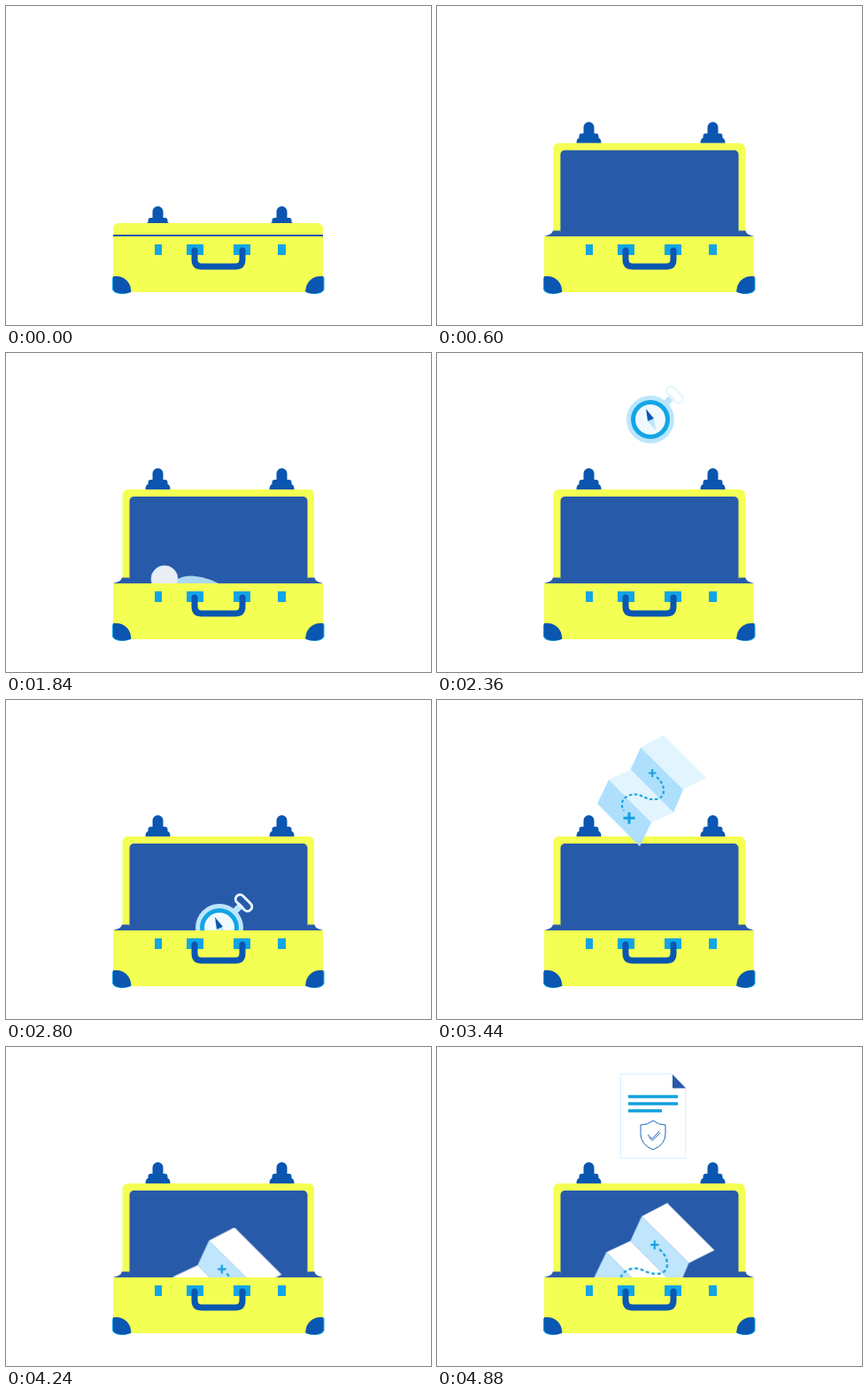
Recreate the animation shown at these times as an HTML page. Size 480 px wide and 360 px high, loop 7840 ms.

```html
<!DOCTYPE html>
<html lang="en">
<head>
<meta charset="utf-8">
<title>Packing a suitcase</title>
<style>
html, body { margin: 0; width: 100%; height: 100%; overflow: hidden; background: #fff; }
svg { display: block; width: 100vw; height: 100vh; }
svg * { animation: 7840ms linear infinite; }

.yellow { fill: #f4ff54; }
.navy { fill: #0a56b0; }
.inside { fill: #285aaa; }
.sky { fill: #12a5e6; }
.pale { fill: #bce6fb; }
.white { fill: #fff; }
.edge { stroke: #d8f1fc; stroke-width: 1; }
.line { fill: none; stroke: #12a0e0; }
.knit { fill: none; stroke: #4aaede; }

/* suitcase */
#feet { animation-name: feet; }
#lid { animation-name: lid; }
#lining { animation-name: lining; }
#wedge { animation-name: wedge; transform-origin: 240px 260px; }
#seam { animation-name: seam; }
@keyframes feet {
  0%, .51% { transform: translateY(96px); animation-timing-function: ease-in-out; }
  8.163%, 100% { transform: none; }
}
@keyframes lid {
  0%, .51% { x: 121px; y: 245px; width: 237px; height: 16px; animation-timing-function: ease-in-out; }
  8.163%, 100% { x: 131.5px; y: 154px; width: 216.5px; height: 106px; }
}
@keyframes lining {
  0%, .51% { x: 128px; y: 260px; width: 223px; height: 0; animation-timing-function: ease-in-out; }
  8.163%, 100% { x: 139.5px; y: 162px; width: 201px; height: 100px; }
}
@keyframes wedge {
  0%, .51% { transform: scaleY(0); animation-timing-function: ease-in-out; }
  8.163%, 100% { transform: none; }
}
@keyframes seam {
  0%, 1% { opacity: 1; }
  1.02%, 100% { opacity: 0; }
}

/* each item pops in above the case, then drops */
#woolens { animation-name: woolens; transform-origin: 241px 133px; }
#compass { animation-name: compass; transform-origin: 244px 252px; }
#map { animation-name: map; transform-origin: 242.5px 102.5px; }
#paper { animation-name: paper; transform-origin: 244px 78px; }
@keyframes woolens {
  0%, 8.673% { transform: translateY(-50px) scale(0); opacity: 1; animation-timing-function: ease-out; }
  12.755%, 13.265% { transform: translateY(-50px) scale(1); animation-timing-function: ease-in; }
  15.306% { transform: none; }
  17.602% { transform: translateY(172px); animation-timing-function: ease-out; }
  19.133%, 23.2% { transform: translateY(166px); opacity: 1; }
  23.469% { transform: translateY(166px); opacity: .9; }
  25.51%, 100% { transform: translateY(166px); opacity: 0; }
}
@keyframes compass {
  0%, 23.597% { transform: translateY(-182px) scale(0); opacity: 1; animation-timing-function: ease-out; }
  28.699%, 30.102% { transform: translateY(-182px) scale(1); animation-timing-function: ease-in; }
  31.122% { transform: translateY(-158px); }
  33.418% { transform: translateY(14px); animation-timing-function: ease-out; }
  35.714%, 38.265% { transform: none; opacity: 1; }
  40.306%, 100% { transform: none; opacity: 0; }
}
@keyframes map {
  0%, 38.265% { transform: scale(0); }
  40.816% { transform: scale(.69); }
  43.878% { transform: scale(1); animation-timing-function: ease-out; }
  45.408%, 46.429% { transform: scale(1.11); animation-timing-function: ease-in; }
  52.041% { transform: translate(.3px, 184px) scale(1.11); animation-timing-function: ease-in; }
  54.082% { transform: translate(.5px, 170.5px) scale(1.11); animation-timing-function: ease-out; }
  62.245%, 100% { transform: translate(2.5px, 143px) scale(1.11); }
}
@keyframes paper {
  0%, 56.122% { transform: scale(0); animation-timing-function: ease-out; }
  61.224% { transform: scale(.9); }
  62.245%, 100% { transform: none; }
}

/* the sheet brightens while it falls */
.lit { animation-name: lit; }
.shade { animation-name: shade; }
@keyframes lit {
  0%, 43.878% { fill: #e2f5fe; }
  54.082%, 100% { fill: #fff; }
}
@keyframes shade {
  0%, 43.878% { fill: #aee0fd; }
  54.082%, 100% { fill: #bfe6fc; }
}
</style>
</head>
<body>
<svg viewBox="0 0 480 360">
  <defs>
    <clipPath id="above"><rect width="480" height="260"/></clipPath>
    <path id="foot" class="navy" d="M-6 143V136a6 6 0 0 1 12 0V143H8Q11 143 11 146V148Q14 149 14 154H-14Q-14 149-11 148V146Q-11 143-8 143Z"/>
    <g id="corner">
      <path class="sky" d="M120 306V320Q122 325 131 325Q139 325 142 321Z"/>
      <path class="navy" d="M121 305H125A16 16 0 0 1 141 321V323Q136 324.500 130 324.500Q121 323 121 319Z"/>
    </g>
  </defs>

  <g id="feet">
    <use href="#foot" x="171.5"/>
    <use href="#foot" x="311.5"/>
  </g>
  <rect id="lid" class="yellow" rx="6"/>
  <rect id="lining" class="inside" rx="5"/>
  <path id="wedge" class="inside" d="M121 260Q130 258 131 253.500H139.500V255H340.500V253.500H348.500Q349 258 358 260Z"/>

  <g clip-path="url(#above)">
    <g id="woolens">
      <path class="sky" d="M228 154L248 136L252 154Z"/>
      <path class="pale" d="M190 160Q169 121 179 103Q191 85 210 85.500Q233 87 251 101Z"/>
      <circle class="white edge" cx="179" cy="89" r="15"/>
      <g transform="translate(227 137.500) rotate(-45)">
        <rect class="white edge" x="-43.500" y="-9" width="87" height="18" rx="4"/>
        <path class="knit" stroke-width="7" stroke-dasharray="3.5 3.6" d="M-37 0.500H38"/>
      </g>
      <path class="pale" d="M258 165Q252 192 272 192Q284 192 289 176Q291 182 297 182Q304 182 305 172L303 155L314 137L302 128L280 150Z"/>
      <path fill="#5db8e6" d="M293 147L278 162L285 166Z"/>
      <path class="white edge" d="M278 112L250 138Q240 150 248 163Q258 174 272 168Q282 160 293 147Q289 156 284 164Q288 168 292 163Q296 157 298 149L303 140Z"/>
      <g transform="translate(294 124) rotate(44)">
        <rect class="white edge" x="-20" y="-8.500" width="40" height="17" rx="3"/>
        <path class="knit" stroke-width="7" stroke-dasharray="3 3.2" d="M-16 0H17"/>
      </g>
    </g>

    <g id="compass">
      <path d="M256 241L266 231" stroke="#bce6fb" stroke-width="7"/>
      <rect x="-11" y="-5" width="22" height="10" rx="5" transform="translate(268.5 229) rotate(45)" fill="none" stroke="#eaf7fd" stroke-width="3"/>
      <circle class="pale" cx="241" cy="257" r="27"/>
      <circle class="sky" cx="241" cy="257" r="22"/>
      <circle cx="241" cy="257" r="17" fill="#f0fafe"/>
      <path class="navy" d="M236 245L245 256L238 259Z"/>
      <path class="pale" d="M245 256L238 259L247 269Z"/>
    </g>

    <g id="map">
      <path class="lit" d="M256 40L230 53.500L278 101L304 88Z"/>
      <path class="shade" d="M230 53.500L218.500 78.500L267 127L278 101Z"/>
      <path class="lit" d="M218.500 78.500L194 90L242 138L267 127Z"/>
      <path class="shade" d="M194 90L181 117L229 165L242 138Z"/>
      <path class="line" stroke-width="2" stroke-dasharray="3.5 2.5" d="M248 87C260 97 258 112 246 112C235 113 229 104 219 107C208 110 207 118 211 125"/>
      <path class="line" stroke-width="2" d="M239 82.500H247.500M243.200 78V87"/>
      <path class="line" stroke-width="3" d="M210.500 133H223.500M217 126.500V139.500"/>
    </g>

    <g id="paper">
      <path class="white edge" d="M207.500 30.500H266L280.500 46V125.500H207.500Z"/>
      <path class="inside" d="M266 31L281 46.500H266Z"/>
      <path class="line" stroke-width="3.500" d="M216 56H272M216 64H272M216 72H254"/>
      <g fill="none" stroke="#1b68ba">
        <path d="M244 83Q250 88 258 88V98Q258 110 244 116Q230 110 230 98V88Q238 88 244 83Z"/>
        <path d="M238 99L243 103.500L251 95M239 101.500L243 105.500L252 97"/>
      </g>
    </g>
  </g>

  <path class="yellow" d="M121 260H358V319Q358 323 354 323H125Q121 323 121 319Z"/>
  <rect id="seam" class="navy" x="121" y="258" width="237" height="2"/>
  <use href="#corner"/>
  <use href="#corner" transform="matrix(-1 0 0 1 479.500 0)"/>
  <path class="sky" d="M168 269h8v12h-8zM204 269h19v12h-19zM257 269h19v12h-19zM307 269h9v12h-9z"/>
  <path d="M213 276V286Q213 294 221 294H259Q267 294 267 286V276" fill="none" stroke="#0a56b0" stroke-width="7" stroke-linecap="round"/>
</svg>
</body>
</html>
```
